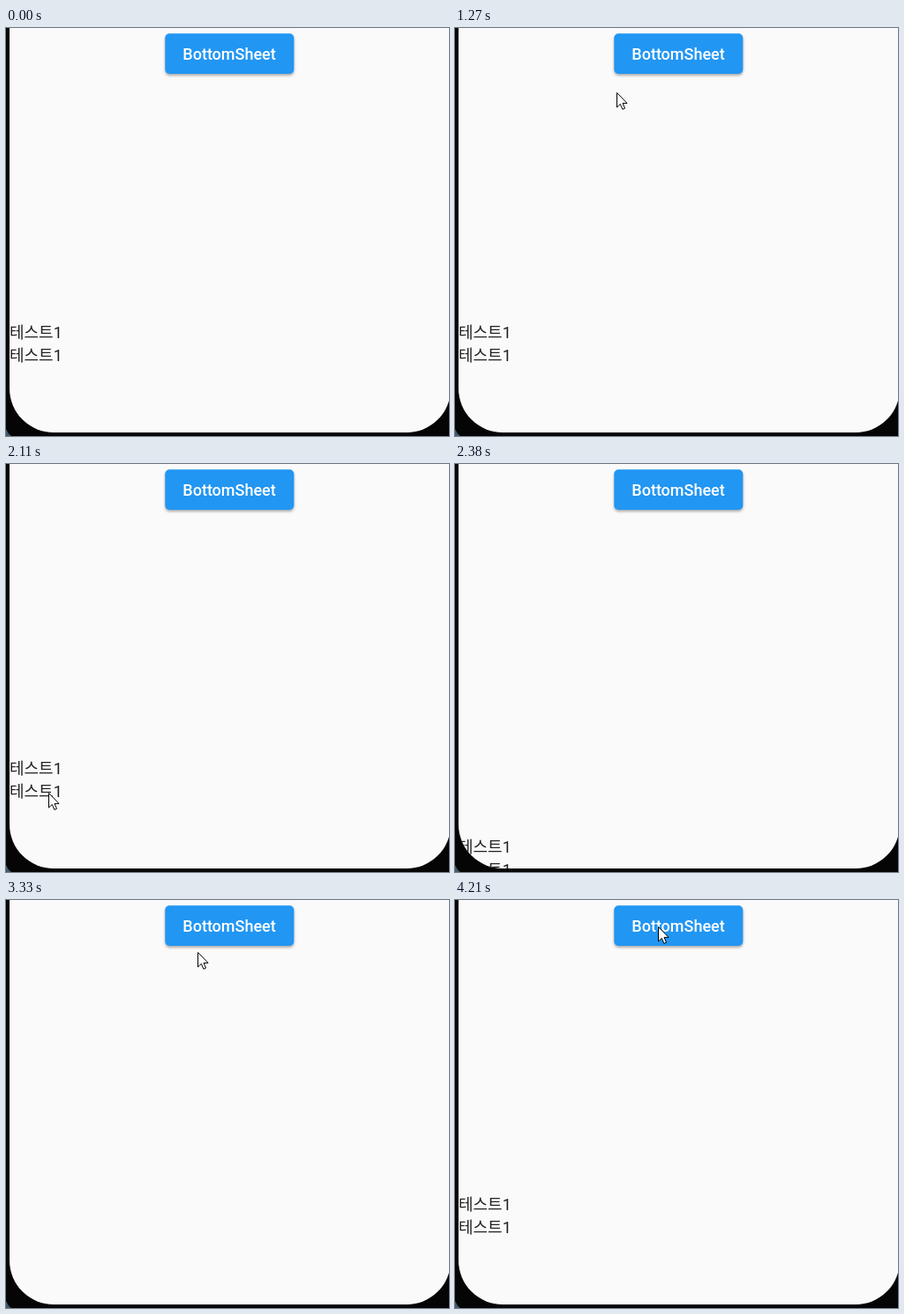
An HTML page that plays this animation: 502 px wide and 463 px high, repeating every 4.74 s.

```html
<!DOCTYPE html>
<html lang="ko">
<head>
<meta charset="utf-8">
<style>
  html, body { margin: 0; height: 100%; overflow: hidden; background: #050505; }
  svg { display: block; }
  text { font: 18px Roboto, "Noto Sans CJK KR", sans-serif; fill: #202020; }
  #label { font-weight: 500; fill: #fff; text-anchor: middle; }
  #button { fill: #2196f3; filter: drop-shadow(0 2px 1.5px rgba(0, 0, 0, .32)); }
  #button.raised { filter: drop-shadow(0 5px 3.5px rgba(0, 0, 0, .34)); }
</style>
</head>
<body>
<svg width="502" height="463" viewBox="0 0 502 463">
  <clipPath id="screenClip"><rect x="4" y="-100" width="500" height="559" rx="50"/></clipPath>
  <clipPath id="buttonClip"><rect x="180" y="6" width="146" height="46" rx="5"/></clipPath>
  <path d="M0 455Q2 460 6 463H0Z" fill="#435b6b"/>
  <g clip-path="url(#screenClip)">
    <rect width="502" height="463" fill="#fafafa"/>
    <g id="sheet">
      <text x="4" y="352">테스트1</text>
      <text x="4" y="377.6">테스트1</text>
    </g>
    <rect id="button" x="180.3" y="6.3" width="146" height="45.7" rx="5"/>
    <g clip-path="url(#buttonClip)"><circle id="ripple" cx="231" cy="31" fill="#fff"/></g>
    <text id="label" x="253" y="35.5">BottomSheet</text>
  </g>
  <path id="cursor" d="M.5 .5V17L4.3 13.4L6.9 19.3L9.5 18.2L7 12.4H12Z" fill="#fff" stroke="#000"/>
</svg>
<script>
const LOOP = 4740;
const [sheet, button, ripple, cursor] =
  ['sheet', 'button', 'ripple', 'cursor'].map(id => document.getElementById(id));

// Bezier strokes of the pointer; lead = 1 when it moves on from where it rested.
const strokes = [
  { start: 500, end: 990, steps: 8, lead: 0, points: [[426, 408], [305, 171], [221, 160]] },
  { start: 1060, end: 1570, steps: 8, lead: 1, points: [[221, 160], [205, 10], [130, 45], [86, 326]] },
  { start: 1630, end: 1760, steps: 3, lead: 1, points: [[86, 326], [60, 345], [48, 349]] },
  { start: 1960, end: 2450, steps: 8, lead: 1, points: [[48, 349], [48, 335], [48, 437], [48, 482]] },
  { start: 2780, end: 3260, steps: 8, lead: 0, points: [[70, 402], [178, 135], [210, 75]] },
  { start: 3330, end: 3540, steps: 4, lead: 1, points: [[210, 75], [225, 40], [230, 30]] },
];
const press = { start: 3670, end: 3810, steps: 3 };
const release = { start: 4070, end: 4210, steps: 3 };
const DRAG_START = 1960, SHEET_GONE = 2580, SHEET_BACK = 4140;
const GRAB_Y = 349, DRAG_SLOP = 25;

const stepAt = (t, { start, end, steps }) =>
  Math.min(steps - 1, Math.floor((t - start) / (end - start) * (steps - 1) + .001));

function bezier(points, u) {
  while (points.length > 1) {
    points = points.slice(1).map((p, i) => p.map((v, k) => points[i][k] * (1 - u) + v * u));
  }
  return points[0];
}

function pointerAt(t) {
  const stroke = strokes.findLast(s => t >= s.start);
  if (!stroke) return null;
  const { steps, lead, points } = stroke;
  return bezier(points, (stepAt(t, stroke) + lead) / (steps - 1 + lead));
}

function rippleAt(t) {
  const pressed = stepAt(t, press), released = stepAt(t, release);
  if (pressed < 0 || released === 2) return [0, 0];
  return released < 0 ? [8 + 9 * pressed, .19] : [60 + 45 * released, .17 - .08 * released];
}

function draw(t) {
  const pointer = pointerAt(t);
  cursor.style.display = pointer ? '' : 'none';
  if (pointer) cursor.setAttribute('transform', `translate(${pointer.map(Math.round)})`);

  const dragging = t >= DRAG_START && t < SHEET_GONE;
  const drop = dragging ? Math.max(0, Math.round(pointer[1] - GRAB_Y - DRAG_SLOP)) : 0;
  sheet.setAttribute('transform', `translate(0 ${drop})`);
  sheet.style.display = t >= SHEET_GONE && t < SHEET_BACK ? 'none' : '';

  const [radius, opacity] = rippleAt(t);
  ripple.setAttribute('r', radius);
  ripple.setAttribute('opacity', opacity);
  button.classList.toggle('raised', radius > 8);
}

const origin = performance.now();
(function tick() {
  draw((performance.now() - origin) % LOOP);
  requestAnimationFrame(tick);
})();
</script>
</body>
</html>
```
